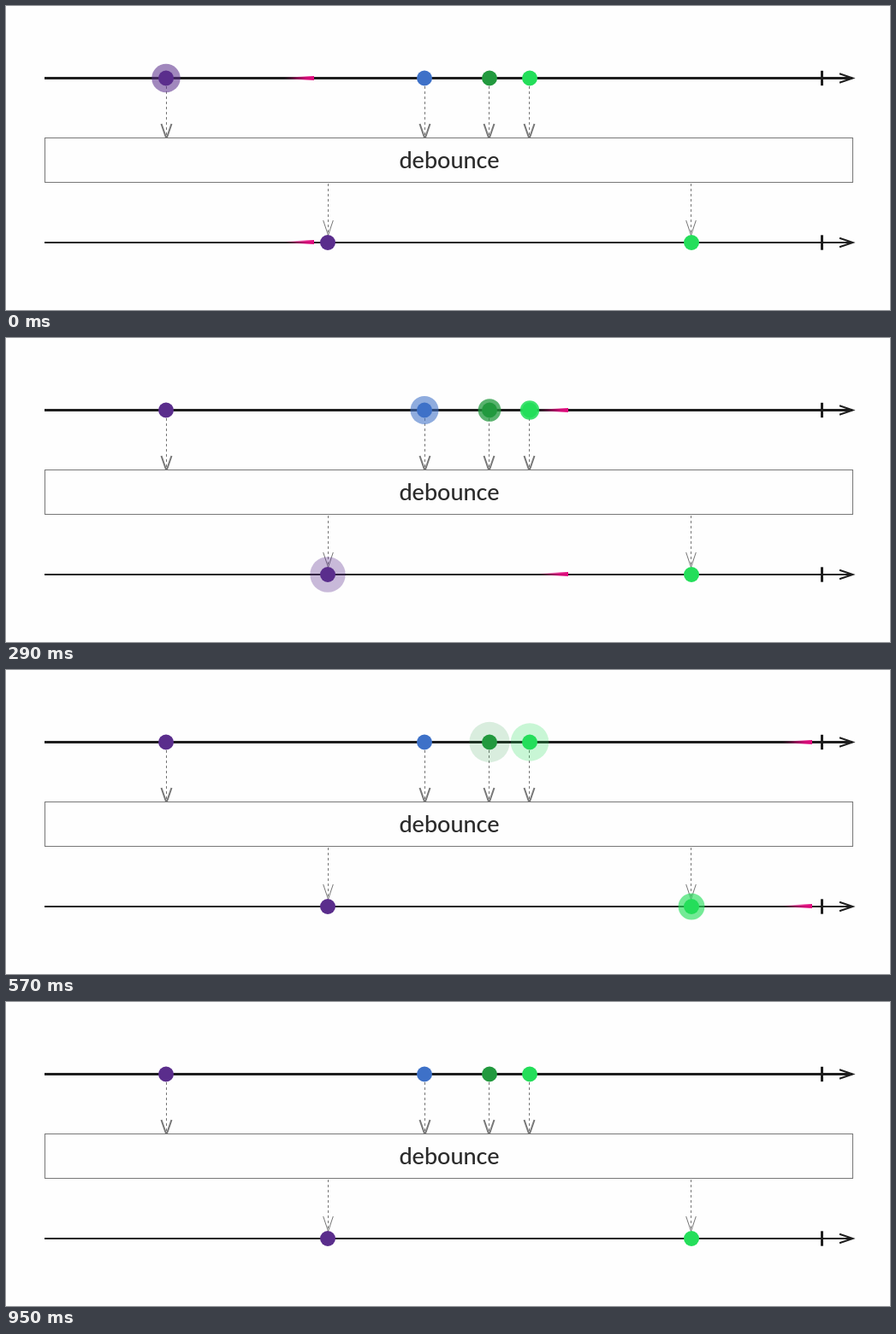
Animation, 1033 px wide and 356 px high, one loop 1.38 s. Source, as an HTML page with a canvas:

```html
<!DOCTYPE html>
<html lang="en">
<head>
<meta charset="utf-8">
<title>debounce</title>
<style>
html, body { margin: 0; width: 100%; height: 100%; overflow: hidden; background: #fefefe; }
canvas { display: block; width: 1033px; height: 356px; }
</style>
</head>
<body>
<canvas id="stage" width="1033" height="356"></canvas>
<script>
const ctx = document.getElementById('stage').getContext('2d');
const LOOP = 1380, SPEED = 1.021;
const TOP = 84.5, BOTTOM = 277, INK = '#1e1e1e', GREY = '#777';
const PURPLE = '90,45,140', BLUE = '62,113,200', GREEN = '34,153,62', LIME = '36,222,90';

const balls = [
  { x: 187, y: TOP, c: PURPLE },
  { x: 489, y: TOP, c: BLUE },
  { x: 565, y: TOP, c: GREEN },
  { x: 612, y: TOP, c: LIME },
  { x: 376, y: BOTTOM, c: PURPLE },
  { x: 801, y: BOTTOM, c: LIME }
];

// The picture advances in steps: [time, position of the comet's head].
const steps = [
  [0, 360], [50, 412], [110, 474], [170, 535], [230, 596], [290, 657],
  [330, 697], [370, 738], [430, 801], [490, 864], [530, 903], [570, 942],
  [630, 1003], [690, 1064], [740, 1116], [780, 1157], [840, 1216], [950, 1330]
];

function path(points, color, width) {
  ctx.beginPath();
  points.forEach(([x, y]) => ctx.lineTo(x, y));
  ctx.strokeStyle = color;
  ctx.lineWidth = width;
  ctx.stroke();
}

function disc(x, y, r, color) {
  ctx.beginPath();
  ctx.arc(x, y, r, 0, Math.PI * 2);
  ctx.fillStyle = color;
  ctx.fill();
}

function axis(y, width) {
  path([[45, y], [989, y]], INK, width);
  path([[953.5, y - 8.7], [953.5, y + 8.7]], INK, 3);
  path([[974, y - 5.3], [989.5, y], [974, y + 5.3]], INK, 2);
}

function arrow(x, from, tip, half, width) {
  ctx.setLineDash([3, 3]);
  path([[x, from], [x, tip - 1]], GREY, 1);
  ctx.setLineDash([]);
  path([[x - half, tip - 17.5], [x, tip], [x + half, tip - 17.5]], GREY, width);
}

function operator() {
  ctx.fillStyle = '#fefefe';
  ctx.fillRect(45, 154, 945, 53);
  ctx.strokeStyle = GREY;
  ctx.lineWidth = 1;
  ctx.strokeRect(45.5, 154.5, 944, 52);
  ctx.fillStyle = '#2b2b2b';
  ctx.font = '500 27px Lato, "Noto Sans", sans-serif';
  ctx.textAlign = 'center';
  ctx.fillText('debounce', 518, 190);
}

function ripple({ x, y, c }, head) {
  const age = (head - x) / SPEED;
  if (age < 0 || age > 415) return;
  const grow = 0.0508 * age - 0.00003 * age * age;
  disc(x, y, 9 + grow, `rgba(${c},${1 - grow / 17.6})`);
}

function comet(head, y) {
  const tail = head - 35;
  const fade = ctx.createLinearGradient(tail, 0, head, 0);
  fade.addColorStop(0, 'rgba(226,10,126,0)');
  fade.addColorStop(0.75, 'rgba(226,10,126,.9)');
  fade.addColorStop(1, 'rgb(226,10,126)');
  ctx.beginPath();
  ctx.moveTo(tail, y - 0.8);
  ctx.lineTo(head, y - 2.6);
  ctx.lineTo(head, y + 2.6);
  ctx.lineTo(tail, y + 0.8);
  ctx.fillStyle = fade;
  ctx.fill();
}

function draw(t) {
  let head = 0;
  for (const [time, x] of steps) if (t >= time) head = x;
  ctx.fillStyle = '#fefefe';
  ctx.fillRect(0, 0, 1033, 356);
  axis(TOP, 3);
  axis(BOTTOM, 2.2);
  for (const { x, y } of balls) {
    if (y === TOP) arrow(x + (x === 612 || x === 565 ? -0.5 : 0.5), 94, 155.5, 6, 2);
    else arrow(x + (x === 801 ? -0.5 : 0.5), 208, 268.5, 5.8, 1);
  }
  operator();
  balls.forEach(b => ripple(b, head));
  balls.forEach(b => disc(b.x, b.y, 9, `rgb(${b.c})`));
  if (head < 990) {
    comet(head, TOP);
    comet(head, BOTTOM - 0.5);
  }
}

const start = performance.now();
function tick() {
  draw((performance.now() - start) % LOOP);
  requestAnimationFrame(tick);
}
tick();
</script>
</body>
</html>
```
